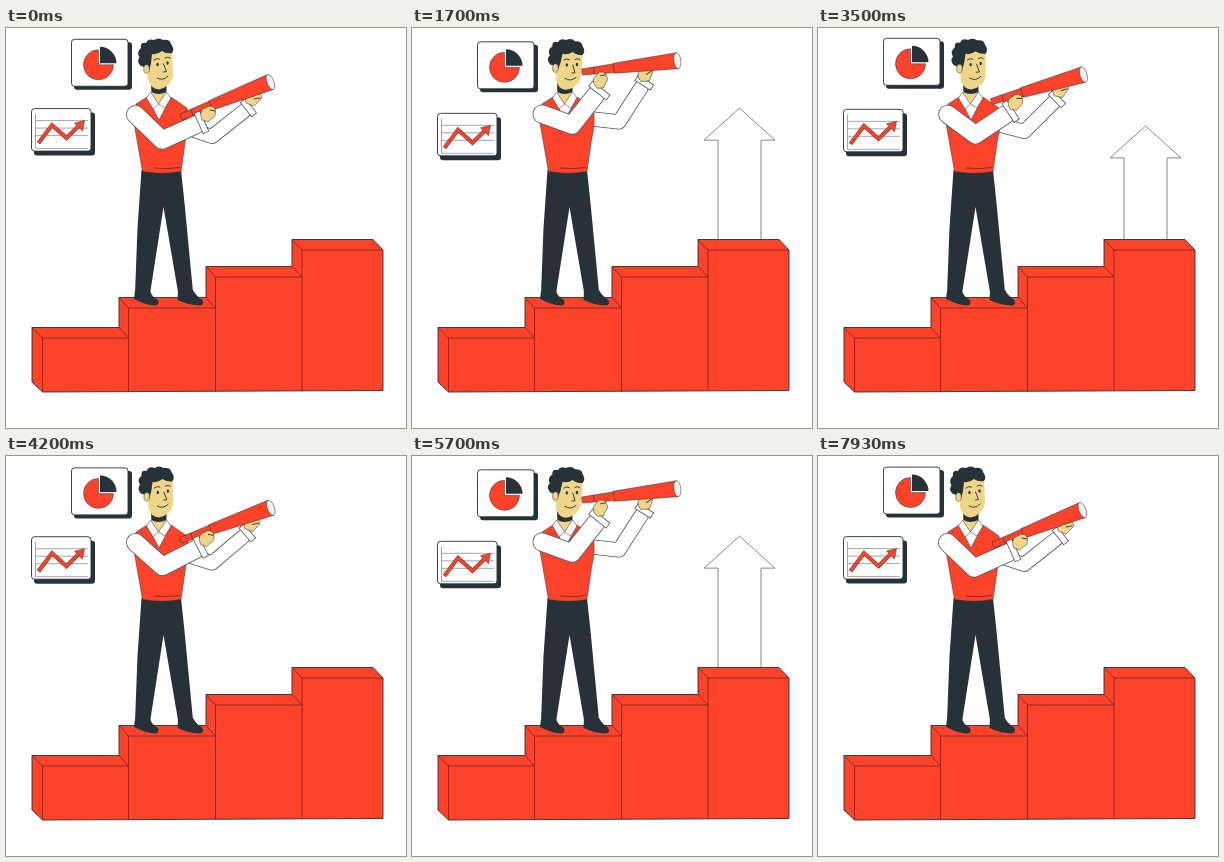
Write an HTML page that moves like this. It is 400 px wide and 400 px high and loops after 8.01 s.

```html
<!DOCTYPE html>
<html lang="en">
<head>
<meta charset="utf-8">
<title>Looking ahead</title>
<style>
  html, body { margin: 0; width: 100%; height: 100%; overflow: hidden; background: #fff; }
  svg { display: block; width: 100vw; height: 100vh; }
  .red { fill: #ff432b; }
  .dark { fill: #263238; }
  .skin { fill: #efd588; }
  .white { fill: #fff; }
  .edge { stroke: #263238; stroke-width: .9; stroke-linejoin: round; }
  .fine { stroke: #263238; stroke-width: .5; stroke-linejoin: round; }
  .line { fill: none; stroke: #263238; stroke-width: .9; stroke-linecap: round; }
  .seam { fill: none; stroke: #8a2a20; stroke-width: 1; }
  .grid { fill: none; stroke: #8b9295; stroke-width: .8; }
  .limb path { fill: none; stroke-linejoin: round; }
</style>
</head>
<body>
<svg viewBox="0 0 400 400">
  <defs>
    <clipPath id="sky"><path d="M0 0H400V211.5H0Z"/></clipPath>
  </defs>

  <g id="pie">
    <rect class="dark" x="68" y="3" width="58" height="47.5" rx="3"/>
    <rect class="white edge" x="65.5" y="0" width="56.5" height="47" rx="3"/>
    <path class="red fine" d="M92.5 25.5V10.5A15 15 0 1 0 107.5 25.5Z"/>
    <path class="dark" d="M94 24V7.5A16.500 16.500 0 0 1 110.5 24Z"/>
  </g>

  <g id="chart">
    <rect class="dark" x="28" y="4" width="61" height="43" rx="3"/>
    <rect class="white edge" x="25.5" y="0" width="59.5" height="42.5" rx="3"/>
    <path class="grid" d="M29.5 5V40H82M29.5 12H82M29.5 19.5H82M29.5 27H82"/>
    <path d="M32.5 34.500L46 16.500L60.5 29.500L73 17" fill="none" stroke="#263238" stroke-width="4"/>
    <path class="red fine" d="M68.5 14.500L78.5 12L76.5 22.500Z"/>
    <path d="M32.7 34.200L46 16.500L60.5 29.500L74 16" fill="none" stroke="#ff432b" stroke-width="3.200"/>
  </g>

  <g clip-path="url(#sky)">
    <path id="arrow" d="M327.5 57.500L363 89.500H349V225H306V89.500H292Z" fill="#fff" stroke="#777d80" stroke-width=".9"/>
  </g>

  <g id="stairs">
    <path class="red edge" d="M26 299.5H113V269.5H200V238.5H286V211.5H367L377 222V362.5L36.5 364L26 354Z"/>
    <path class="seam" d="M26 299.5L36.5 310H122.5L113 299.5M36.5 310V364
      M113 269.5L122.5 280H209.5L200 269.5M122.5 280V364
      M200 238.5L209.5 249H296L286 238.5M209.5 249V363.5
      M286 211.5L296 222H377M296 222V363"/>
  </g>

  <g id="farArm" class="limb"></g>
  <g id="farHand">
    <path class="skin fine" d="M-7 4Q-9 -4 -3 -7L5 -7Q10 -4 8 0Q4 4 1 7Z"/>
    <path class="line" d="M1 0L7 -1"/>
  </g>

  <g id="legs">
    <path class="dark" d="M135.500 142H175L178.500 175L187 264H172L157.500 179L144 266H129L131.500 200Z"/>
    <path class="dark" d="M129 263H144Q146 269 152 272Q154 277 149 277.5Q140 277 128 271Z"/>
    <path class="dark" d="M172 262H187Q190 268 196 271.5Q199 276.5 194 277.5Q182 277 171.500 272Z"/>
  </g>

  <g id="torso">
    <path class="white fine" d="M143 67L139 74L153 95L169 75L161 66Z"/>
    <path class="red fine" d="M141 69L130 76L128 95L136.500 143.5Q156 147 175 143.5L179.500 112Q184 93 181 80L165 69L153 92Z"/>
    <path class="seam" d="M148 140Q162 141.5 174 139.5"/>
    <path class="skin" d="M145 52H160V67L152.5 77L145 67Z"/>
    <path class="dark" d="M145 55L160.500 58V64Q152 68 145.500 64Z"/>
    <path class="white fine" d="M144.5 64L140.5 70L147 81L152.5 76Z"/>
    <path class="white fine" d="M160.5 64L165 70L159 80L152.5 76Z"/>
  </g>

  <g id="head">
    <path class="skin" d="M141 25L142 52Q145 61 153 61.500Q164 59 167 48L166 22L150 19Z"/>
    <path class="dark" d="M135 38Q130 34 133.500 29Q130 24 135 20Q134 14 140 15Q142 10 148 12Q153 9 157 12Q164 11 165 16Q169 21 166 25Q160 26 156 23Q151 27 146 26L145 35L143 43Q139 43 138.500 39Z"/>
    <ellipse class="skin fine" cx="140.500" cy="41" rx="2.800" ry="4.300"/>
    <path class="line" d="M148 32Q151 29.500 153.5 31M159 30Q162 28 164 30M157.5 36L160.5 43.500L157.500 44M151 50Q157 53.5 162 48"/>
    <ellipse class="dark" cx="151.5" cy="36.500" rx="1.200" ry="1.700"/>
    <ellipse class="dark" cx="161.5" cy="35" rx="1.200" ry="1.700"/>
  </g>

  <g id="scope">
    <path class="red fine" d="M0 -3L12 -3.500V3.500L0 3Z"/>
    <path class="red fine" d="M12 -3.500L33 -4.500V4.500L12 3.500Z"/>
    <path class="red fine" d="M32 -5L96 -8V8L32 5Z"/>
    <ellipse class="fine" cx="96" cy="0" rx="3.500" ry="8" fill="#f7f1ee"/>
  </g>

  <g id="nearArm" class="limb"></g>
  <g id="nearHand">
    <path class="skin fine" d="M-6 7Q-9 0 -5 -4L2 -7Q8 -6 7.5 -1Q8 4 3 6L0 9Z"/>
    <path class="line" d="M2 -3L7 -2"/>
  </g>
</svg>

<script>
  const LOOP = 8010, CYCLE = 4000;
  const ink = '#4b5559';
  const $ = id => document.getElementById(id);
  const mix = (a, b, k) => a + (b - a) * k;
  const mixPt = ([a, b], k) => [mix(a[0], b[0], k), mix(a[1], b[1], k)];
  const ease = (t, from, to) => {
    const p = Math.min(1, Math.max(0, (t - from) / (to - from)));
    return (1 - Math.cos(Math.PI * p)) / 2;
  };
  const wave = (t, peak) => Math.cos((t - peak) / CYCLE * 2 * Math.PI);
  const move = (id, x, y, turn = 0) =>
    $(id).setAttribute('transform', `translate(${x} ${y}) rotate(${turn})`);

  // Shoulder, elbow and wrist, each as [lowered, raised].
  const near = [[[129.5, 86.5], [130, 86]], [[156, 112], [160, 97]], [[195, 94.5], [187, 63]]];
  const far = [[[172, 97], [172, 90]], [[206, 108.5], [207, 94]], [[242, 80], [232, 55]]];
  const hands = { nearHand: [[202, 85], [188, 51.5]], farHand: [[247, 71], [233.5, 47]] };
  const eyepiece = [[175, 89], [170, 44]];
  const lens = [[264.5, 54], [267, 32.5]];

  function makeArm(id, width) {
    const addStroke = (color, w, cap) => {
      const path = document.createElementNS('http://www.w3.org/2000/svg', 'path');
      path.setAttribute('stroke', color);
      path.setAttribute('stroke-width', w);
      path.setAttribute('stroke-linecap', cap);
      $(id).append(path);
      return path;
    };
    const paths = [
      addStroke(ink, width, 'round'), addStroke('#fff', width - 1.6, 'round'),
      addStroke(ink, width + 4, 'butt'), addStroke('#fff', width + 2.4, 'butt')
    ];
    return (joints, k) => {
      const [shoulder, elbow, wrist] = joints.map(j => mixPt(j, k));
      const len = Math.hypot(wrist[0] - elbow[0], wrist[1] - elbow[1]);
      const along = d => [0, 1].map(i => wrist[i] + (wrist[i] - elbow[i]) / len * d);
      // The round sleeve end stays hidden under the cuff.
      const sleeve = `M${shoulder}L${elbow}L${along(-.3 * width)}`;
      const cuff = (a, b) => `M${along(a)}L${along(b)}`;
      [sleeve, sleeve, cuff(-3, 4), cuff(-2.2, 3.2)]
        .forEach((d, i) => paths[i].setAttribute('d', d));
    };
  }

  const drawNear = makeArm('nearArm', 19);
  const drawFar = makeArm('farArm', 15);

  function draw(time) {
    const t = time % LOOP % CYCLE;
    const raise = ease(t, 30, 850) - ease(t, 3050, 3800);
    const grow = ease(t, 1100, 1900) - ease(t, 3280, 3930);

    move('pie', 0, 12.2 + 2 * wave(t, 1300));
    move('chart', 0, 83.1 + 2.5 * wave(t, 2000));
    move('arrow', 0, 156 * (1 - grow));
    $('head').setAttribute('transform', `rotate(${6.5 * raise} 150 66)`);

    const [x, y] = mixPt(eyepiece, raise);
    const [ex, ey] = mixPt(lens, raise);
    move('scope', x, y, Math.atan2(ey - y, ex - x) * 180 / Math.PI);

    drawNear(near, raise);
    drawFar(far, raise);
    for (const id in hands) move(id, ...mixPt(hands[id], raise), -25 * raise);
  }

  const start = performance.now();
  function tick() {
    draw(performance.now() - start);
    requestAnimationFrame(tick);
  }
  tick();
</script>
</body>
</html>
```
